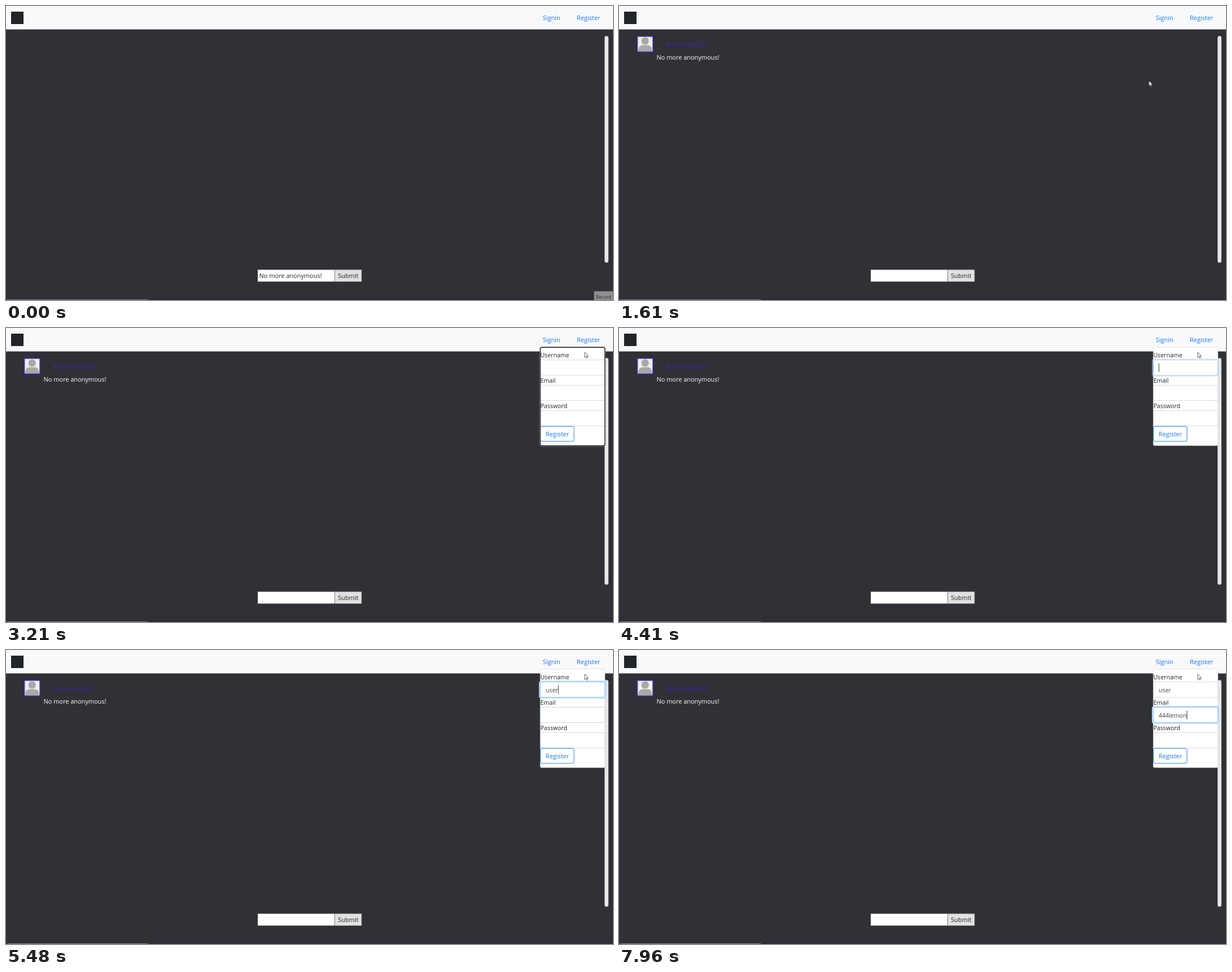
Animation, 1074 px wide and 521 px high, one loop 8000 ms. Source, as an HTML page:

```html
<!DOCTYPE html>
<html lang="en">
<head>
<meta charset="utf-8">
<title>Chat registration</title>
<style>
  html, body { margin: 0; width: 100%; height: 100%; overflow: hidden; background: #2f3136; }
  svg { display: block; width: 1074px; height: 521px; }
  text { font: 10.95px "Open Sans", "Noto Sans", sans-serif; fill: #212529; }
  .label { font-size: 10.6px; }
  .value { font-size: 10.65px; fill: #40464c; }
  .link { fill: #1a75f0; }
  .light { fill: #fff; }
  .name { fill: #3f25b5; }
  .field { fill: #fff; stroke: #ced4da; stroke-width: .8; }
  .caret { fill: #222; }
</style>
</head>
<body>
<svg viewBox="0 0 1074 521">
  <rect width="1074" height="521" fill="#2f3136"/>
  <rect width="1074" height="41.5" fill="#f8f9fa"/>
  <rect x="9" y="10" width="22" height="22" fill="#212529"/>
  <text class="link" x="949.7" y="25">Signin</text>
  <rect id="navRing" x="1000.6" y="6.2" width="60.6" height="29.4" rx="3.5" fill="none" stroke="#007bff" stroke-opacity=".35" stroke-width="2.4"/>
  <text class="link" x="1010" y="25">Register</text>

  <rect x="1059" y="53" width="7" height="402" rx="3.5" fill="#cfcfcf"/>
  <rect x="1060" y="54" width="5" height="400" rx="2.5" fill="#e6e6e6"/>

  <rect y="520" width="1074" height="1" fill="#3b1f3a"/>
  <rect x="2" y="520" width="249" height="1" fill="#85858a"/>

  <rect x="445.3" y="467.2" width="136.2" height="21.2" fill="#fff" stroke="#767676" stroke-width=".7"/>
  <rect id="submit" x="581.7" y="467.2" width="47.4" height="21.2" stroke="#767676" stroke-width=".7"/>
  <text x="587.3" y="482">Submit</text>
  <text id="draft" x="448" y="482">No more anonymous!</text>

  <g id="message">
    <rect x="32.7" y="54" width="27.2" height="27" fill="#eeeeee" stroke="#4a2bd0" stroke-width="1.3"/>
    <circle cx="46.2" cy="62" r="6.6" fill="#a9a9a9"/>
    <path d="M34.3 80.2 V77 Q35 69.5 42 69.5 H50.5 Q57.5 69.5 58.2 77 V80.2 Z" fill="#a9a9a9"/>
    <text class="name" x="83.3" y="72.3">Roommates27</text>
    <text class="light" x="66.5" y="95.2">No more anonymous!</text>
  </g>

  <g id="record">
    <rect x="1040.5" y="505.5" width="34" height="16" fill="#8f8f90"/>
    <text x="1044" y="518.5" style="font-size:8.2px;fill:#333">Record</text>
  </g>

  <g id="panel">
    <rect x="945" y="33.2" width="115" height="175.4" rx="2.8" fill="#fff"/>
    <rect x="945.4" y="33.6" width="114.2" height="174.6" rx="2.5" fill="none" stroke="#d4d5d6" stroke-width=".7"/>
    <text class="label" x="945.4" y="52.3">Username</text>
    <text class="label" x="945.4" y="97.3">Email</text>
    <text class="label" x="945.4" y="142">Password</text>
    <rect class="field" x="945.5" y="56.7" width="114" height="27.2"/>
    <rect class="field" x="945.5" y="101.6" width="114" height="27"/>
    <rect class="field" x="945.5" y="146.6" width="114" height="27"/>
    <rect x="945.5" y="174.3" width="59.5" height="26.6" rx="2.8" fill="#fff" stroke="#1a75f0" stroke-width=".9"/>
    <text class="link" x="954.8" y="192.3">Register</text>
    <g id="outline" fill="none">
      <rect x="944.4" y="33.4" width="116.2" height="176.2" rx="3.5" stroke="#fff" stroke-width=".7"/>
      <rect x="945.3" y="34.3" width="114.4" height="174.4" rx="2.8" stroke="#101010" stroke-width="1.4"/>
    </g>
    <g id="userGlow" fill="none">
      <rect x="944.2" y="55.6" width="116.6" height="29.4" rx="3" stroke="#bfdeff" stroke-width="2.6"/>
      <rect x="945.4" y="56.7" width="114.2" height="27.2" rx="2" stroke="#80bdff" stroke-width=".8"/>
    </g>
    <g id="mailGlow" fill="none">
      <rect x="944.2" y="100.4" width="116.6" height="29.4" rx="3" stroke="#bfdeff" stroke-width="2.6"/>
      <rect x="945.4" y="101.6" width="114.2" height="27" rx="2" stroke="#80bdff" stroke-width=".8"/>
    </g>
    <text id="userText" class="value" x="954.8" y="75"></text>
    <text id="mailText" class="value" x="954.8" y="120"></text>
    <rect id="userCaret" class="caret" y="62.5" width=".9" height="15.5"/>
    <rect id="mailCaret" class="caret" y="107.3" width=".9" height="15.5"/>
    <g id="popup">
      <rect x="920" y="84.6" width="140" height="38.6" rx="2.8" fill="#fff"/>
      <rect x="919.8" y="84.4" width="140.4" height="39" rx="3" fill="none" stroke="#3a2340" stroke-width=".9"/>
      <text x="928.8" y="106.8" style="font-size:8.1px;font-weight:700">user</text>
    </g>
  </g>

  <path id="cursor" d="M0 0 V9.2 L2.1 7.3 L3.5 10.5 L5 9.8 L3.6 6.8 H6.5 Z" fill="#fff" stroke="#222" stroke-width=".7"/>
</svg>
<script>
const LOOP = 8000;
const ui = Object.fromEntries(
  [...document.querySelectorAll("[id]")].map(el => [el.id, el]));

// time, x, y of the pointer tip
const path = [
  [70, 1058, 508], [200, 1048, 370], [340, 1025, 210], [450, 985, 155],
  [670, 904, 255], [870, 771, 355], [1140, 606, 475], [1300, 606, 475],
  [1610, 937, 133], [1740, 1031, 54], [1880, 1032, 4], [2010, 1029, 20],
  [2210, 1029, 20], [2450, 1024, 43]
];
const userKeys = [4810, 4940, 5150, 5210];
const mailKeys = [6620, 6750, 6890, 7360, 7490, 7620, 7690, 7960];

const within = (t, a, b) => t >= a && t < b;
const ramp = (t, a, b) => Math.min(1, Math.max(0, (t - a) / (b - a)));
const show = (el, on) => el.style.opacity = +on;

function pointAt(t) {
  const i = path.findIndex(p => p[0] > t);
  if (i < 0) return path[path.length - 1].slice(1);
  if (i === 0) return path[0].slice(1);
  const [a, b] = [path[i - 1], path[i]];
  const k = ramp(t, a[0], b[0]);
  return [1, 2].map(n => a[n] + (b[n] - a[n]) * k);
}

function type(field, caret, text, keys, t) {
  const typed = text.slice(0, keys.filter(k => k <= t).length);
  if (field.textContent !== typed) field.textContent = typed;
  const width = typed ? field.getComputedTextLength() : 0;
  caret.setAttribute("x", 954.8 + width);
}

function draw(t) {
  show(ui.record, t < 70);
  show(ui.draft, t < 1270);
  show(ui.message, t >= 1270);
  ui.submit.setAttribute("fill", within(t, 1110, 1360) ? "#d0d0d0" : "#e1e1e1");

  show(ui.navRing, ramp(t, 1990, 2140) - ramp(t, 2460, 2610));
  show(ui.panel, t >= 2110);
  show(ui.outline, within(t, 3210, 4350));
  show(ui.userGlow, ramp(t, 4330, 4480) - ramp(t, 5470, 5620));
  show(ui.mailGlow, ramp(t, 5470, 5620));
  show(ui.popup, within(t, 4940, 5420) ? 1 - ramp(t, 5205, 5420) : 0);

  type(ui.userText, ui.userCaret, "user", userKeys, t);
  type(ui.mailText, ui.mailCaret, "444lemon", mailKeys, t);
  show(ui.userCaret, within(t, 4350, 5490));
  show(ui.mailCaret, t >= 5490 && !within(t, 6020, 6550));

  show(ui.cursor, t >= 70);
  ui.cursor.setAttribute("transform", `translate(${pointAt(t)})`);
}

const start = performance.now();
function tick() {
  draw((performance.now() - start) % LOOP);
  requestAnimationFrame(tick);
}
tick();
</script>
</body>
</html>
```
